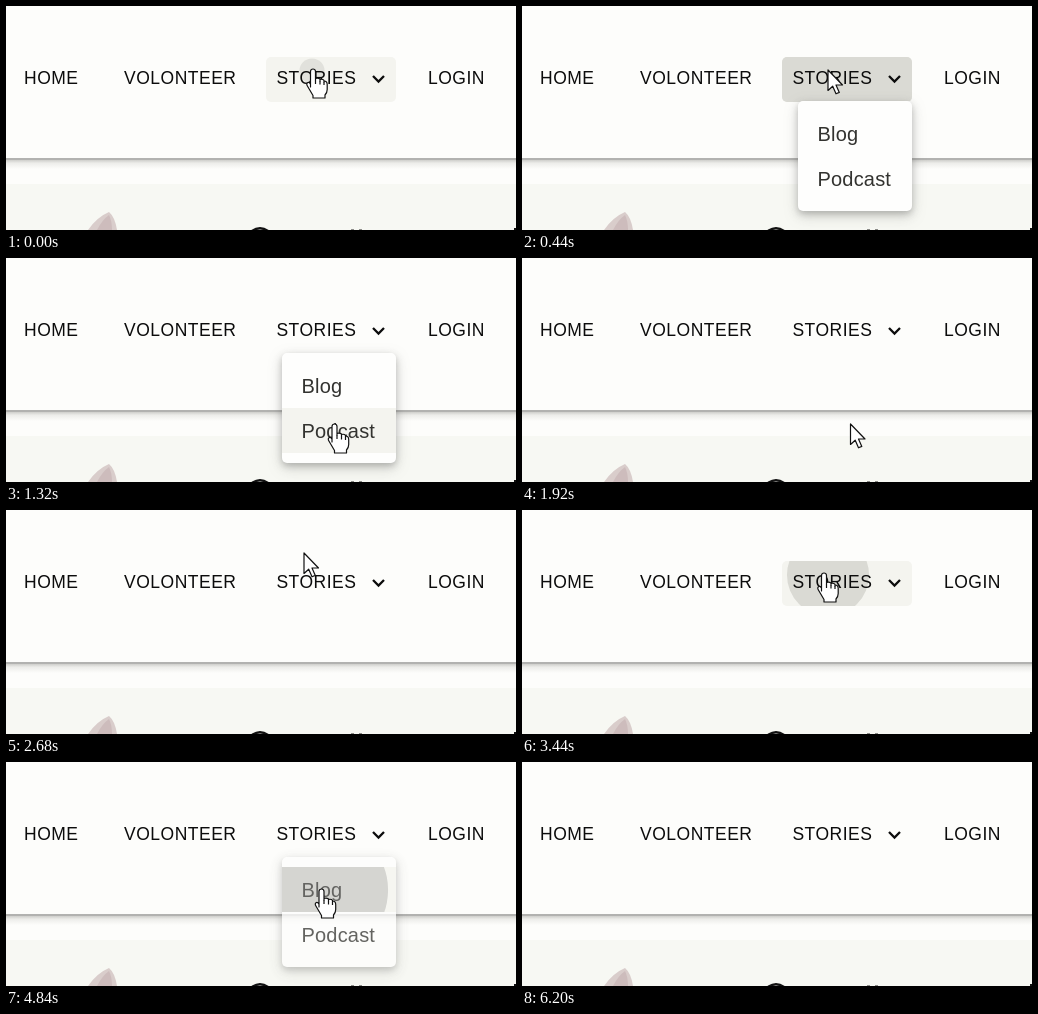
An HTML page that plays this animation: 510x224 px, repeating every 6.4 s.

```html
<!DOCTYPE html>
<html lang="en">
<head>
<meta charset="utf-8">
<title>Navigation menu</title>
<style>
  html, body { margin: 0; width: 100%; height: 100%; overflow: hidden; background: #fdfdfb; }
  svg { display: block; width: 510px; height: 224px; }
  text { font-family: "Liberation Sans", Arial, sans-serif; }
  .nav { font-size: 17.5px; letter-spacing: .5px; fill: #0c0c0c; }
  .item { font-size: 20px; letter-spacing: .19px; fill: #333330; }
  .hover { fill: #f4f4ef; }
  .ripple { fill: #dadad4; }
  #menu .ripple { fill: #c8c8c4; }
  #paper { filter: drop-shadow(0 3px 3px rgba(60, 60, 60, .25)) drop-shadow(0 4px 7px rgba(80, 80, 75, .24)); }
  #cursor path { stroke: #111; stroke-width: 1.2; stroke-linejoin: round; fill: #fff; }
</style>
</head>
<body>
<svg viewBox="0 0 510 224" xmlns="http://www.w3.org/2000/svg">
  <defs>
    <linearGradient id="shade" x1="0" y1="0" x2="0" y2="1">
      <stop offset="0" stop-color="#cfcfcb"/>
      <stop offset=".35" stop-color="#ededea"/>
      <stop offset="1" stop-color="#fdfdfb"/>
    </linearGradient>
    <clipPath id="btnClip"><rect x="260" y="51" width="130" height="45" rx="5"/></clipPath>
    <clipPath id="blogClip"><rect x="276" y="105" width="114" height="45"/></clipPath>
    <clipPath id="podClip"><rect x="276" y="150" width="114" height="45"/></clipPath>
  </defs>

  <rect width="510" height="224" fill="#fdfdfb"/>
  <rect y="178" width="510" height="46" fill="#f7f8f3"/>
  <rect y="154" width="510" height="9" fill="url(#shade)"/>
  <rect y="152" width="510" height="2" fill="#b2b2b0"/>
  <path d="M82 224Q91 211 103 206Q109 211 111 224Z" fill="#d9cdcb"/>
  <path d="M91 224Q96 214 103 209Q106 215 106 224Z" fill="#cdbcbc"/>
  <path d="M246 225Q254 219.500 262 225" fill="none" stroke="#111" stroke-width="2.500"/>
  <path d="M345 223.500h3M353 223.500h3" stroke="#8c8c88"/>
  <path d="M509 222v2" stroke="#111" stroke-width="2"/>

  <g clip-path="url(#btnClip)">
    <rect id="btnHover" class="hover" x="260" y="51" width="130" height="45"/>
    <circle id="btnRipple" class="ripple" cx="306" cy="65"/>
  </g>
  <text class="nav" x="18" y="78">HOME</text>
  <text class="nav" x="118" y="78">VOLONTEER</text>
  <text class="nav" x="270.400" y="78">STORIES</text>
  <text class="nav" x="422" y="78">LOGIN</text>
  <path d="M367 70L372.500 75.500L378 70" fill="none" stroke="#0c0c0c" stroke-width="2.300"/>

  <g id="menu">
    <rect id="paper" x="276" y="95" width="114" height="110" rx="5" fill="#fefefd"/>
    <g clip-path="url(#blogClip)">
      <rect id="blogHover" class="hover" x="276" y="105" width="114" height="45"/>
      <circle id="blogRipple" class="ripple" cx="316" cy="128"/>
    </g>
    <g clip-path="url(#podClip)">
      <rect id="podHover" class="hover" x="276" y="150" width="114" height="45"/>
      <circle id="podRipple" class="ripple" cx="329" cy="168"/>
    </g>
    <text class="item" x="295.500" y="135">Blog</text>
    <text class="item" x="295.500" y="180">Podcast</text>
  </g>

  <g id="cursor">
    <path id="arrow" d="M0 0V20.500L4.700 16.200L8 23.800L11.300 22.400L8 15H14.500Z"/>
    <g id="hand">
      <path d="M-2.500 18V2.500a2.500 2.500 0 0 1 5 0V11V9.500q2.500-1 4.500 .5V12V10.500q2.500-.8 4 .8V13v-1q3.200 0 3.200 3.500v5q0 3-2.200 5.500v3H0v-2.500L-5.600 17q-1.500-2.500 .5-3.500q1.500-.3 2.600 1.700Z"/>
      <path d="M2.500 11v4M7 12v3.500M11 13v3" fill="none"/>
    </g>
  </g>
</svg>
<script>
const LOOP = 6400;
const $ = id => document.getElementById(id);
const clamp = v => Math.max(0, Math.min(1, v));
const ramp = (t, a, b) => clamp((t - a) / (b - a));
const smooth = p => p * p * (3 - 2 * p);
const within = (t, spans) => spans.some(([a, b]) => t >= a && t < b);

// cubic-bezier(.4, 0, .2, 1)
function standard(x) {
  let lo = 0, hi = 1;
  for (let i = 0; i < 18; i++) {
    const s = (lo + hi) / 2, r = 1 - s;
    if (1.2 * r * r * s + .6 * r * s * s + s ** 3 < x) lo = s; else hi = s;
  }
  return lo * lo * (3 - 2 * lo);
}

// time, x, y of the pointer tip
const route = [
  [0, 307, 63], [80, 307, 63], [200, 306, 64], [760, 306, 64], [1240, 328.5, 166],
  [2440, 328.5, 166], [2670, 298, 43], [2700, 298, 43], [3040, 302, 63],
  [3960, 302, 63], [4240, 315.5, 127], [5440, 315.5, 127], [6080, 46, 230], [LOOP, 46, 230]
];
const handSpans = [[0, 160], [965, 1800], [2850, 4860]];
const menuSpans = [[180, 1660], [3440, 4770]];
const hovers = {
  btnHover: [[-200, 760], [2850, 3980]],
  blogHover: [[960, 1110], [4120, 5100]],
  podHover: [[1110, 2100]]
};
// start of the press, start and end of the fade
const presses = {
  btnRipple: { r: 92, runs: [[-110, 470, 720], [3260, 3600, 3820]] },
  blogRipple: { r: 81, runs: [[4547, 4900, 5100]] },
  podRipple: { r: 81, runs: [[1430, 1790, 2000]] }
};

function pointer(t) {
  const i = route.findIndex((p, n) => n && t <= p[0]);
  const [t0, x0, y0] = route[i - 1], [t1, x1, y1] = route[i];
  const p = smooth(ramp(t, t0, t1));
  return [x0 + (x1 - x0) * p, y0 + (y1 - y0) * p];
}

function drawMenu(t) {
  let alpha = 0, grow = 0;
  for (const [open, close] of menuSpans) {
    if (t < open || t > close + 240) continue;
    const shown = standard(ramp(t, open, open + 250));
    alpha = shown * (1 - smooth(ramp(t, close, close + 220)));
    grow = shown * (1 - standard(ramp(t, close + 80, close + 300)));
  }
  const sx = .75 + .25 * grow, sy = .5625 + .4375 * grow;
  $("menu").setAttribute("opacity", alpha);
  $("menu").setAttribute("transform", `translate(390 95) scale(${sx} ${sy}) translate(-390 -95)`);
}

function draw(t) {
  for (const id in hovers) {
    const level = Math.max(...hovers[id].map(([a, b]) => ramp(t, a, a + 120) * (1 - ramp(t, b, b + 150))));
    $(id).setAttribute("opacity", level);
  }
  for (const id in presses) {
    const { r, runs } = presses[id];
    const run = runs.find(([a, , end]) => t >= a && t < end);
    $(id).setAttribute("r", run ? r * standard(ramp(t, run[0], run[0] + 550)) : 0);
    $(id).setAttribute("opacity", run ? ramp(t, run[0], run[0] + 160) * (1 - ramp(t, run[1], run[2])) : 0);
  }
  drawMenu(t);
  const hand = within(t, handSpans);
  $("hand").setAttribute("display", hand ? "inline" : "none");
  $("arrow").setAttribute("display", hand ? "none" : "inline");
  $("cursor").setAttribute("transform", `translate(${pointer(t)})`);
}

function tick() {
  draw(performance.now() % LOOP);
  requestAnimationFrame(tick);
}
tick();
</script>
</body>
</html>
```
